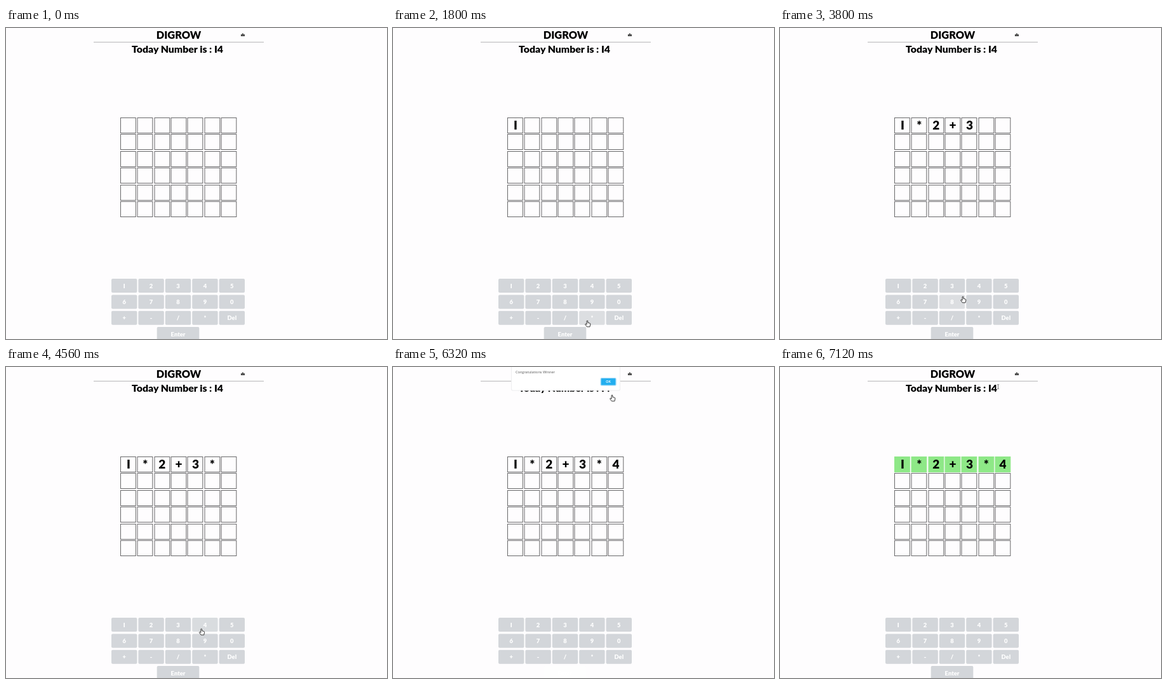
These frames come from a looping animation (600x490 px, 7200 ms). An HTML page:

```html
<!DOCTYPE html>
<html lang="en">
<head>
<meta charset="utf-8">
<title>Number game</title>
<style>
  html, body { margin: 0; width: 100%; height: 100%; overflow: hidden; background: #fefdfe; }
  svg { display: block; width: 600px; height: 490px; font-family: Lato, "Open Sans", sans-serif; font-weight: 900; }
  .cell { fill: #fefdfe; stroke: #68686a; stroke-width: 1; }
  .win .cell.first { fill: #8ee887; stroke: #8ee887; }
  .guess { font-size: 19px; text-anchor: middle; }
  .label { font-size: 9.4px; text-anchor: middle; fill: #fff; }
  .hand { fill: #fff; stroke: #222; stroke-width: .9; stroke-linejoin: round; }
</style>
</head>
<body>
<svg id="stage" viewBox="0 0 600 490">
  <text x="272" y="16.5" font-size="16.4" text-anchor="middle">DIGROW</text>
  <path d="M138 22.3H406" stroke="#b4b4b6"/>
  <path d="M370 10h1.6v3H370zM372.1 8.6h1.6V13h-1.6zM374.2 10h1.6v3h-1.6z" fill="#222"/>
  <text x="198" y="39" font-size="15.8">Today Number is : I4</text>
  <g id="board"></g>
  <g id="keys"></g>
  <g id="dialog">
    <rect x="186" y="-4" width="172" height="41.5" rx="2" fill="#eeeef0"/>
    <rect x="187" y="-4" width="170" height="40.5" rx="2" fill="#fff"/>
    <text x="193" y="9.6" font-size="5.6" font-family="Open Sans, sans-serif" font-weight="400" fill="#555">Congratulations Winner</text>
    <rect x="326.6" y="17" width="25" height="12.6" rx="2" fill="#8fd4f6"/>
    <rect x="328" y="18.3" width="22.2" height="10" rx="1" fill="#22aeef"/>
    <text x="339.1" y="25.2" font-size="5" text-anchor="middle" font-weight="700" fill="#fff">OK</text>
  </g>
  <path id="hand" class="hand" d="M-.9 .6Q0-.6.9.6V3.4L4.2 4.2Q5 4.6 4.8 6L4 9.8H-.6L-3.3 6.2Q-3.2 4.8-2 5.3L-.9 6.2Z"/>
  <path id="arrow" class="hand" d="M0 0V8.6L2 6.8 3.4 9.8 4.8 9.2 3.5 6.3H6.2Z"/>
  <path id="beam" d="M-1.5-3.5Q0-3.5 0-2.5Q0-3.5 1.5-3.5M0-2.5V2.5M-1.5 3.5Q0 3.5 0 2.5Q0 3.5 1.5 3.5" fill="none" stroke="#444" stroke-width=".7"/>
</svg>
<script>
const LOOP = 7200, OPEN = 5560, CLOSE = 6680, FADE = 200;
const $ = id => document.getElementById(id);

function add(parent, tag, attrs, text) {
  const el = document.createElementNS('http://www.w3.org/2000/svg', tag);
  for (const k in attrs) el.setAttribute(k, attrs[k]);
  if (text) el.textContent = text;
  return parent.appendChild(el);
}

for (let r = 0; r < 6; r++)
  for (let c = 0; c < 7; c++)
    add($('board'), 'rect', {
      class: r ? 'cell' : 'cell first',
      x: Math.round(181 + c * 26.35) - .5 + .5 * (c > 0),
      y: Math.round(142 + r * 26.4) - .5, width: 23.8, height: 24
    });

// Typed symbols and when they show up; "I" gives the plain-bar one.
const typed = [['I', 840], ['*', 1960], ['2', 2680], ['+', 3080], ['3', 3560], ['*', 4240], ['4', 4860]]
  .map(([ch, at], i) => ({
    at, el: add($('board'), 'text', { class: 'guess', x: 193 + i * 26.35, y: 160.3 }, ch)
  }));

const keys = [];
function addKey(label, x, y, w) {
  const el = add($('keys'), 'rect', { x, y, width: w, height: 22, rx: 2 });
  add($('keys'), 'text', { class: 'label', x: x + w / 2, y: y + 14.6 }, label);
  keys.push({ x, y, w, el, label });
}
['I', '2', '3', '4', '5', '6', '7', '8', '9', '0', '+', '-', '/', '*', 'Del'].forEach((k, i) =>
  addKey(k, 166 + (i % 5) * 42.4, 395 + Math.floor(i / 5) * 25.4, 40.4));
addKey('Enter', 237.7, 471, 66.6);

// Pointer tip: time, x, y
const path = [
  [40, 581, 472], [700, 184, 405], [900, 184, 405], [1480, 292, 457], [1760, 292, 457],
  [1800, 306, 461], [2040, 306, 461], [2400, 240, 410], [2680, 240, 410], [2840, 209, 432],
  [3000, 188, 454], [3140, 188, 454], [3400, 273, 404], [3660, 273, 404], [3800, 288, 423],
  [4000, 306, 453], [4320, 306, 453], [4640, 308, 405], [4880, 308, 405], [5160, 276, 478],
  [5640, 276, 478], [6320, 345, 44], [6480, 340, 23], [6700, 340, 23], [6840, 343.5, 31]
];

function pointer(t) {
  const i = path.findIndex(p => p[0] > t);
  if (i === 0) return [path[0][1], path[0][2]];
  if (i < 0) return path[path.length - 1].slice(1);
  const [t0, x0, y0] = path[i - 1], [t1, x1, y1] = path[i];
  const u = (t - t0) / (t1 - t0), e = u * u * (3 - 2 * u);
  return [x0 + (x1 - x0) * e, y0 + (y1 - y0) * e];
}

function over(k, t) {
  if (t < 40) return false;
  if (t >= OPEN && t < CLOSE) return k.label === 'Enter';
  const [x, y] = pointer(t);
  return x >= k.x && x <= k.x + k.w && y >= k.y && y <= k.y + 22;
}

// Share of the fade-in spent under the pointer; leaving resets at once.
function hover(k, t) {
  let n = 0;
  while (n < 20 && over(k, t - n * FADE / 20)) n++;
  return n / 20;
}

const mix = (a, b, u) => a + (b - a) * u;
const show = (el, on) => el.setAttribute('visibility', on ? 'visible' : 'hidden');

function draw(t) {
  typed.forEach(s => show(s.el, t >= s.at));
  keys.forEach(k => {
    const h = hover(k, t);
    k.el.setAttribute('fill', `rgb(${mix(211, 254, h)},${mix(214, 254, h)},${mix(218, 254, h)})`);
  });
  const open = t >= OPEN && t < CLOSE, won = t >= CLOSE;
  show($('dialog'), open);
  $('board').classList.toggle('win', won);

  const [x, y] = pointer(t);
  const onKeys = x >= 166 && x <= 377 && y >= 395;
  const kind = t < 40 ? '' : won ? 'beam' : open || onKeys ? 'hand' : 'arrow';
  ['hand', 'arrow', 'beam'].forEach(id => {
    show($(id), id === kind);
    $(id).setAttribute('transform', `translate(${x.toFixed(2)} ${y.toFixed(2)})`);
  });
}

const start = performance.now();
function tick() {
  draw((performance.now() - start) % LOOP);
  requestAnimationFrame(tick);
}
draw(0);
requestAnimationFrame(tick);
</script>
</body>
</html>
```
